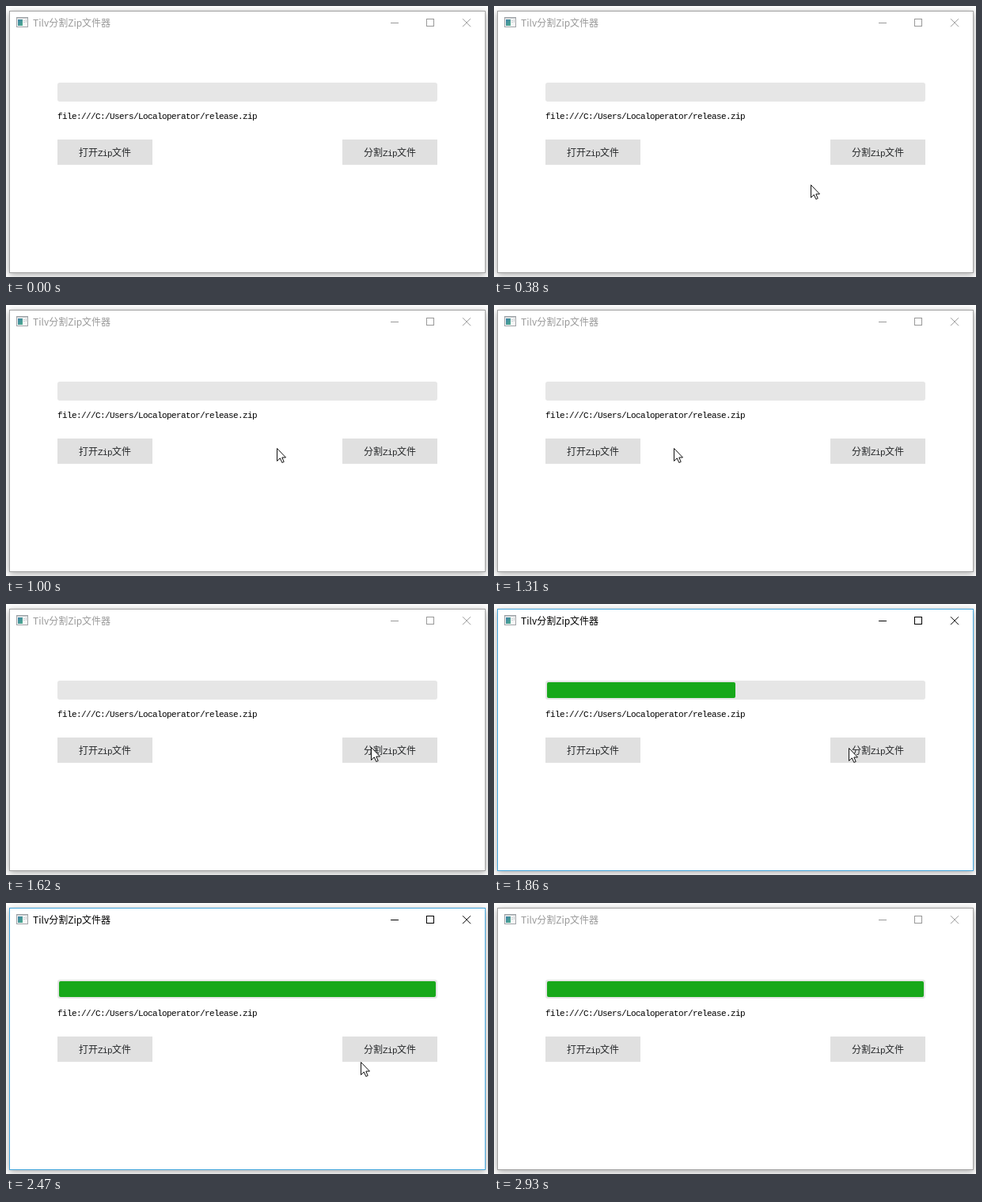
An HTML page for the animation above (3010 ms loop, 609x343 px).

```html
<!DOCTYPE html>
<html lang="zh-CN">
<head>
<meta charset="utf-8">
<title>Zip</title>
<style>
  html, body { margin: 0; width: 100%; height: 100%; overflow: hidden; background: #fff; }
  svg { display: block; width: 100vw; height: 100vh; }
  text { font: 12px "Noto Sans CJK SC", "Noto Sans CJK", sans-serif; white-space: pre; }
  .mono { font: 11px "Liberation Mono", monospace; letter-spacing: -.6px; }
  .title { fill: #999; }
  .frame { fill: none; stroke: #a3a3a3; }
  .controls { fill: none; stroke: #999; }
  .active .title { fill: #000; }
  .active .frame { stroke: #43a5dc; }
  .active .controls { stroke: #000; }
</style>
</head>
<body>
<svg viewBox="0 0 609 343">
  <defs>
    <filter id="shadow" x="-5%" y="-10%" width="110%" height="120%">
      <feDropShadow dx="0" dy="2" stdDeviation="4" flood-color="#000" flood-opacity=".36"/>
    </filter>
    <linearGradient id="teal" x2="1" y2="1">
      <stop stop-color="#3d7fa6"/>
      <stop offset="1" stop-color="#4fae8c"/>
    </linearGradient>
  </defs>
  <g id="window">
    <rect x="4" y="6" width="602" height="332" fill="#fff" filter="url(#shadow)"/>
    <rect class="frame" x="4.5" y="6.5" width="601" height="331"/>

    <g>
      <rect x="13.5" y="14.5" width="14" height="12" fill="#f6f6f6" stroke="#a0a4a8"/>
      <path d="M14 15.5H27" stroke="#c3c7ca"/>
      <rect x="15" y="17" width="6" height="8" fill="url(#teal)"/>
      <path d="M22 18.5H24M22 20.5H24M25.5 17V21" stroke="#c9ced2"/>
    </g>
    <text class="title" x="34" y="26">Tilv分割Zip文件器</text>
    <g class="controls">
      <path d="M486 21.5H496"/>
      <rect x="531.5" y="16.5" width="9" height="9"/>
      <path d="M577 16.2L587 26.2M587 16.2L577 26.2"/>
    </g>

    <rect x="65" y="97" width="480" height="24" rx="3" fill="#e6e6e6"/>
    <rect id="bar" x="67" y="99" width="0" height="20" rx="2" fill="#17a81a"/>
    <text class="mono" x="65" y="143">file:///C:/Users/Localoperator/release.zip</text>

    <g fill="#26282a">
      <rect x="65" y="169" width="120" height="32" fill="#e0e0e0"/>
      <text x="92" y="189.5">打开<tspan class="mono">Zip</tspan>文件</text>
      <rect x="425" y="169" width="120" height="32" fill="#e0e0e0"/>
      <text x="452" y="189.5">分割<tspan class="mono">Zip</tspan>文件</text>
    </g>
  </g>
  <path id="cursor" d="M.5 .5V16.5L4.3 12.9L6.8 18.5L9.2 17.5L6.8 12H11.5Z"
        fill="#fff" stroke="#111" stroke-linejoin="round"/>
</svg>
<script>
const LOOP = 3010, ACTIVE_FROM = 1690, ACTIVE_TO = 2930, BAR_WIDTH = 476;
const [win, bar, cursor] = ['window', 'bar', 'cursor'].map(id => document.getElementById(id));

// Each stroke steps evenly through its points, then rests on the last; null hides the cursor.
const strokes = [
  { from: 150, to: 450, points: [[475, 311], [460, 287], [433, 257], [400, 226], [376, 209]] },
  { from: 620, to: 1080, points: [[404, 194], [436, 184], [449, 182], [452, 182], [417, 181], [342, 181], [268, 181]] },
  { from: 1160, to: 1620, points: [[238, 181], [229, 181], [227, 181], [252, 181], [330, 181], [424, 181], [461, 181]] },
  { from: 1690, to: 2010, points: [[455, 181], [450, 182], [448, 182], [448, 182], [448, 182]] },
  { from: 2470, to: 2780, points: [[448, 201], [441, 226], [470, 272], [575, 328], null] }
];

function stepOf(t, from, to, last) {
  const i = Math.floor((t - from + 4) / (to - from) * last);
  return Math.max(0, Math.min(last, i));
}

function cursorAt(t) {
  const stroke = strokes.filter(s => t >= s.from).pop();
  if (!stroke) return null;
  const { from, to, points } = stroke;
  return points[stepOf(t, from, to, points.length - 1)];
}

function render(t) {
  win.classList.toggle('active', t >= ACTIVE_FROM && t < ACTIVE_TO);
  bar.setAttribute('width', BAR_WIDTH * stepOf(t, ACTIVE_FROM, 2010, 4) / 4);
  const pos = cursorAt(t);
  cursor.setAttribute('visibility', pos ? 'visible' : 'hidden');
  if (pos) cursor.setAttribute('transform', `translate(${pos})`);
}

const start = performance.now();
function tick() {
  render((performance.now() - start) % LOOP);
  requestAnimationFrame(tick);
}
tick();
</script>
</body>
</html>
```
